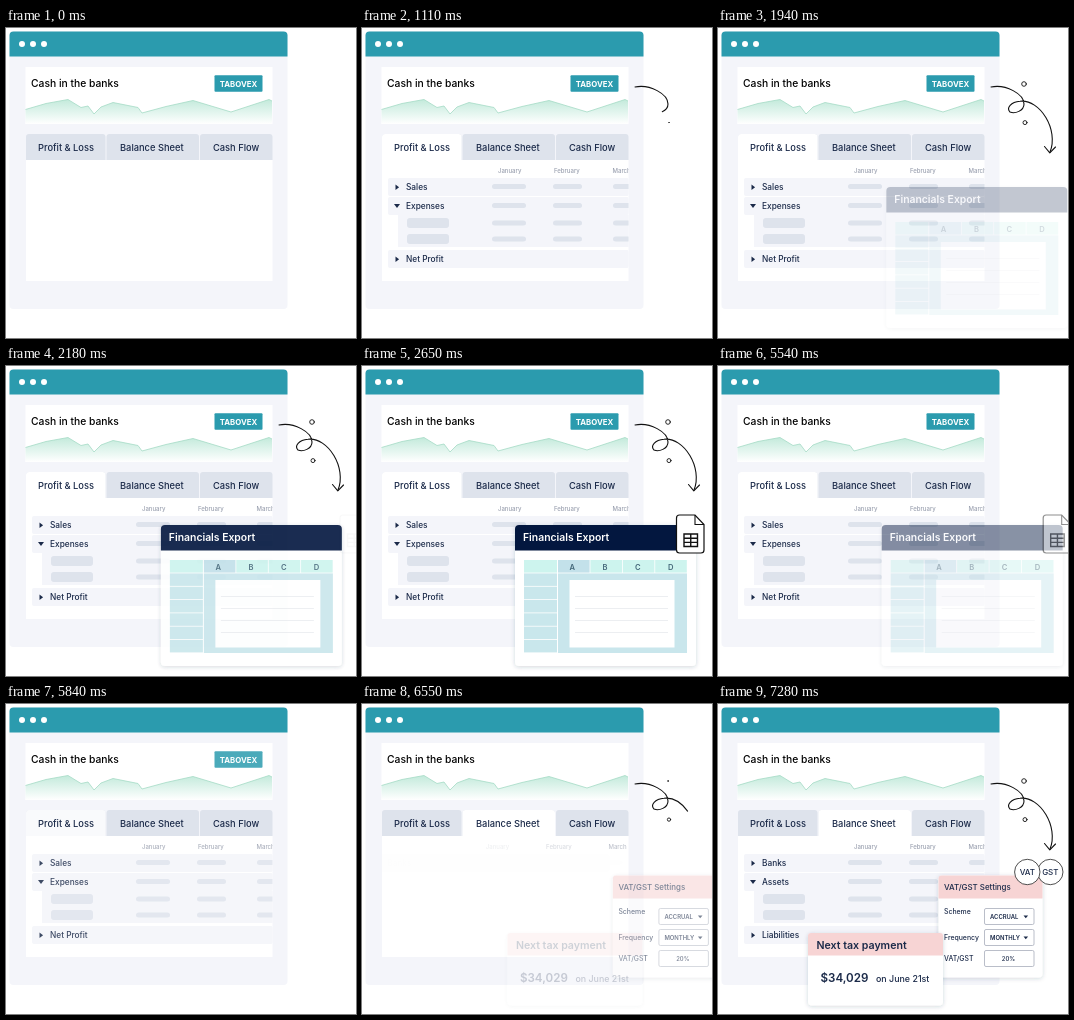
An HTML page for the animation above (8 s loop, 350x310 px).

```html
<!DOCTYPE html>
<html lang="en">
<head>
<meta charset="utf-8">
<style>
  html, body { margin: 0; width: 100%; height: 100%; overflow: hidden; background: #fff; }
  svg { display: block; font-family: Inter, sans-serif; font-weight: 500; }
</style>
</head>
<body>
<svg id="stage" width="350" height="310" viewBox="0 0 350 310"></svg>
<script>
const NAVY = '#1b2a49', TEAL = '#2b9bae', GREY = '#dee3ec', PALE = '#f4f5fa', PINK = '#f7d4d4';
const MID = 'text-anchor="middle"', BOLD = 'font-weight="600"';

const rect = (x, y, w, h, fill, extra = '') =>
  `<rect x="${x}" y="${y}" width="${w}" height="${h}" fill="${fill}" ${extra}/>`;
const text = (x, y, size, str, fill = NAVY, extra = '') =>
  `<text x="${x}" y="${y}" font-size="${size}" fill="${fill}" ${extra}>${str}</text>`;
const path = (d, fill = 'none', extra = '') => `<path d="${d}" fill="${fill}" ${extra}/>`;
const group = (id, body, extra = '') => `<g id="${id}" ${extra}>${body}</g>`;
const topRound = (x, y, w, h, r, fill) =>
  path(`M${x} ${y + h}v${r - h}q0 ${-r} ${r} ${-r}h${w - 2 * r}q${r} 0 ${r} ${r}v${h - r}z`, fill);
const sheetCard = (x, y, w, h) => rect(x, y, w, h, '#fff', 'rx="4" filter="url(#shadow)"');

const tabs = [[20, 79.5, 32, 'Profit &amp; Loss'], [100.5, 92.5, 114, 'Balance Sheet'], [194, 72.5, 207, 'Cash Flow']];
const tab = ([x, w, tx, label], fill, h) => topRound(x, 106, w, h, 3, fill) + text(tx, 122.5, 9.3, label);
const activeTab = (id, spec) => group(id, tab(spec, '#fff', 27));

function windowFrame() {
  const line = 'M19.5 81.5L40 75.5 62 71.5 75 79.5 82 78 88 86 95 79 107 74.5 132 79.5 136 85 160 78.5 187 72.5 225 84 263 71.5 266 73';
  return rect(3.5, 3.5, 278, 277.5, PALE, 'rx="4"') + topRound(3.5, 3.5, 278, 25, 4, TEAL) +
    [16, 27, 38].map(x => `<circle cx="${x}" cy="16" r="3" fill="#fff"/>`).join('') +
    rect(19.5, 39, 247, 57, '#fff') + text(25, 59, 10.3, 'Cash in the banks', '#000') +
    path(line + 'V96H19.5z', 'url(#fade)') + path(line, 'none', 'stroke="#a5dbc6" stroke-width=".8"') +
    group('button', rect(208.5, 47.2, 48, 16.6, TEAL, 'rx="1"') + text(232.5, 58.6, 7.8, 'TABOVEX', '#fff', MID + ' font-weight="700"')) +
    rect(20, 132, 246.5, 121, '#fff') + tabs.map(spec => tab(spec, GREY, 26)).join('');
}

function table(id, names) {
  const months = [[136, 'January'], [192, 'February'], [250.5, 'March']]
    .map(([x, m], i) => group(id + 'm' + i, text(x, 145, 6, m, '#9ba1b0'))).join('');
  const values = y => [[130, 34], [191, 29], [251, 29]].map(([x, w]) => rect(x, y, w, 5, GREY, 'rx="2.5"')).join('');
  const row = (y, label, open) =>
    rect(26, y, 241, 18, PALE, 'rx="2"') +
    path(open ? `M32 ${y + 7}h6l-3 4z` : `M33.5 ${y + 6.5}v5.5l3.6-2.75z`, NAVY) +
    text(44, y + 12.3, 8.3, label);
  const sub = y => rect(45, y, 42, 10, GREY, 'rx="3"') + values(y + 2.5);
  return group(id, months +
    group(id + 'r0', row(150, names[0]) + values(156)) +
    group(id + 'r1', rect(36, 187, 231, 32, PALE) + row(169, names[1], true) + values(175) + sub(190) + sub(206)) +
    group(id + 'r2', row(222, names[2])), 'clip-path="url(#card)"');
}

function exportPanel() {
  const columns = [...'ABCD'].map((c, i) =>
    rect(196 + i * 32.4, 194, 31.6, 12.6, i ? '#cdf4ee' : '#c3e1ea') +
    text(210.3 + i * 32.8, 203.7, 7.6, c, '#45687a', `${MID} ${BOLD}`)).join('');
  const side = Array.from({ length: 6 }, (_, i) => rect(162, 207.4 + i * 13.3, 33, 12.5, '#c9e7ec')).join('');
  const rules = [230, 242, 254, 266].map(y => rect(213, y, 93, .7, '#e4e7eb')).join('');
  return group('export', sheetCard(153, 159, 181, 141) +
    topRound(153, 159, 181, 25.5, 4, '#03173f') + text(161, 175.3, 10.4, 'Financials Export', '#fff', BOLD) +
    rect(162, 194, 33, 12.6, '#cdf4ee') + columns + side +
    rect(196, 207.4, 129, 79.6, '#c9e6ec') + rect(207.5, 214, 105, 67.5, '#fff') + rules);
}

const sheetIcon = () => group('sheet',
  path('M318 149h15l9 9.5v25.5q0 3-3 3h-21.5q-3 0-3-3v-32q0-3 3-3z', '#fff', 'stroke-width="1.2"') +
  path('M333 149v9.5h9', 'none', 'stroke-width="1.1"') +
  path('M322 168h13.5v12.5h-13.5zM322 172.2h13.5M322 176.4h13.5M328.75 168v12.5', 'none', 'stroke-width="1.4"'),
  'stroke="#111"');

function vatPanel() {
  const field = (y, labelY, label, value, select) =>
    text(226, labelY, 6.9, label) +
    rect(266.5, y - .5, 49.5, 16, '#fff', 'rx="1.5" stroke="#a9aebb" stroke-width=".8"') +
    (select ? text(272, y + 10, 5.9, value, NAVY, BOLD) + path(`M305.5 ${y + 6.5}h4.6l-2.3 2.8z`, NAVY)
            : text(290.5, y + 10, 5.9, value, NAVY, MID));
  return group('vat', sheetCard(220.5, 171.5, 104, 102) +
    topRound(220.5, 171.5, 104, 23, 3, PINK) + text(226, 185.7, 7.9, 'VAT/GST Settings') +
    field(205, 209.7, 'Scheme', 'ACCRUAL', true) + field(226, 235.5, 'Frequency', 'MONTHLY', true) +
    field(247, 256.5, 'VAT/GST', '20%'));
}

const badges = () => group('badges', [[332.3, 'GST'], [309.3, 'VAT']].map(([x, s]) =>
  `<circle cx="${x}" cy="168" r="12.7" fill="#fff" stroke="#222" stroke-width=".8"/>` +
  text(x, 170.8, 8, s, NAVY, MID)).join(''));

const payment = () => group('payment',
  sheetCard(90, 229, 135, 72.5) + topRound(90, 229, 135, 22.5, 3, PINK) +
  text(98.5, 244.8, 10.6, 'Next tax payment', NAVY, BOLD) +
  text(102.5, 278, 11.6, '$34,029', NAVY, BOLD) + text(158, 278, 8.9, 'on June 21st'));

const arrow = () => group('arrow',
  path('M273 59C288 56 306 66 306 76C306 83 297 86 292 84C288 80 293 74 302 73.3C322 71 341 102 332 124', 'none', 'id="tail" pathLength="1" stroke-dasharray="1 2"') +
  path('M326.5 118.5L331.8 124.8 337.5 119', 'none', 'id="head"') +
  '<circle id="dot0" cx="306" cy="56" fill="none" stroke-width=".9"/><circle id="dot1" cx="307" cy="94.6" fill="none" stroke-width=".9"/>',
  'stroke="#111" stroke-width="1.1" stroke-linecap="round" stroke-linejoin="round"');

const stage = document.getElementById('stage');
stage.innerHTML = `<defs>
  <linearGradient id="fade" x1="0" y1="0" x2="0" y2="1"><stop stop-color="#c3eadb"/><stop offset="1" stop-color="#fff"/></linearGradient>
  <clipPath id="card"><rect x="20" y="132" width="246.5" height="121"/></clipPath>
  <filter id="shadow" x="-10%" y="-10%" width="120%" height="125%"><feDropShadow dx="0" dy="1" stdDeviation="2" flood-color="#24324f" flood-opacity=".2"/></filter>
  </defs>` + windowFrame() + activeTab('tabA', tabs[0]) + activeTab('tabB', tabs[1]) +
  table('a', ['Sales', 'Expenses', 'Net Profit']) + table('b', ['Banks', 'Assets', 'Liabilities']) +
  arrow() + exportPanel() + sheetIcon() + vatPanel() + payment() + badges();

const $ = id => document.getElementById(id);
const ramp = (t, start, length) => Math.min(1, Math.max(0, (t - start) / length));
const sine = p => (1 - Math.cos(Math.PI * p)) / 2;
const easeOut = p => 1 - (1 - p) ** 2;

function place(id, p, dx = 0, opacity = p) {
  const el = $(id);
  el.setAttribute('opacity', opacity);
  el.setAttribute('transform', `translate(${dx * (1 - p)} 0)`);
}

// Months arrive right to left, then the rows from top to bottom
function showTable(id, t, start, step, length) {
  ['m2', 'm1', 'm0', 'r0', 'r1', 'r2'].forEach((part, i) => {
    const p = sine(ramp(t, start + step * (i > 2 ? i + 1 : i), length));
    place(id + part, p, -20, p * p);
  });
}

function showArrow(t) {
  const second = t > 6000, age = t - (second ? 6180 : 960);
  const left = second ? 1 : 1 - ramp(t, 4950, 430);
  const drawn = easeOut(ramp(age, 0, 780)) * left;
  $('arrow').setAttribute('transform', `translate(0 ${second ? 21 : 0})`);
  $('arrow').setAttribute('opacity', drawn > 0 ? 1 : 0);
  $('tail').setAttribute('stroke-dashoffset', 1 - drawn);
  $('head').setAttribute('opacity', ramp(drawn, .94, .06));
  [[270, 2.3], [80, 2]].forEach(([delay, r], i) => {
    const p = sine(ramp(age, delay, 400)) * left;
    $('dot' + i).setAttribute('r', r * p);
    $('dot' + i).setAttribute('opacity', p > 0 ? 1 : 0);
  });
}

function render(t) {
  const leave = 1 - sine(ramp(t, 5780, 240));
  place('button', leave);
  place('tabA', ramp(t, 60, 150) * leave);
  place('tabB', ramp(t, 6180, 150));
  showTable('a', t, 60, 22, 320);
  place('a', leave);
  showTable('b', t, 6200, 68, 500);

  const panelOut = 1 - sine(ramp(t, 5280, 500));
  place('export', sine(ramp(t, 1780, 500)) * panelOut, 20);
  place('sheet', sine(ramp(t, 2130, 500)) * panelOut, 20);
  place('vat', sine(ramp(t, 6280, 500)), 70);
  place('payment', sine(ramp(t, 6400, 500)), 70);
  place('badges', sine(ramp(t, 6760, 500)), 20);
  showArrow(t);
}

function tick() {
  render(performance.now() % 8000);
  requestAnimationFrame(tick);
}
tick();
</script>
</body>
</html>
```
